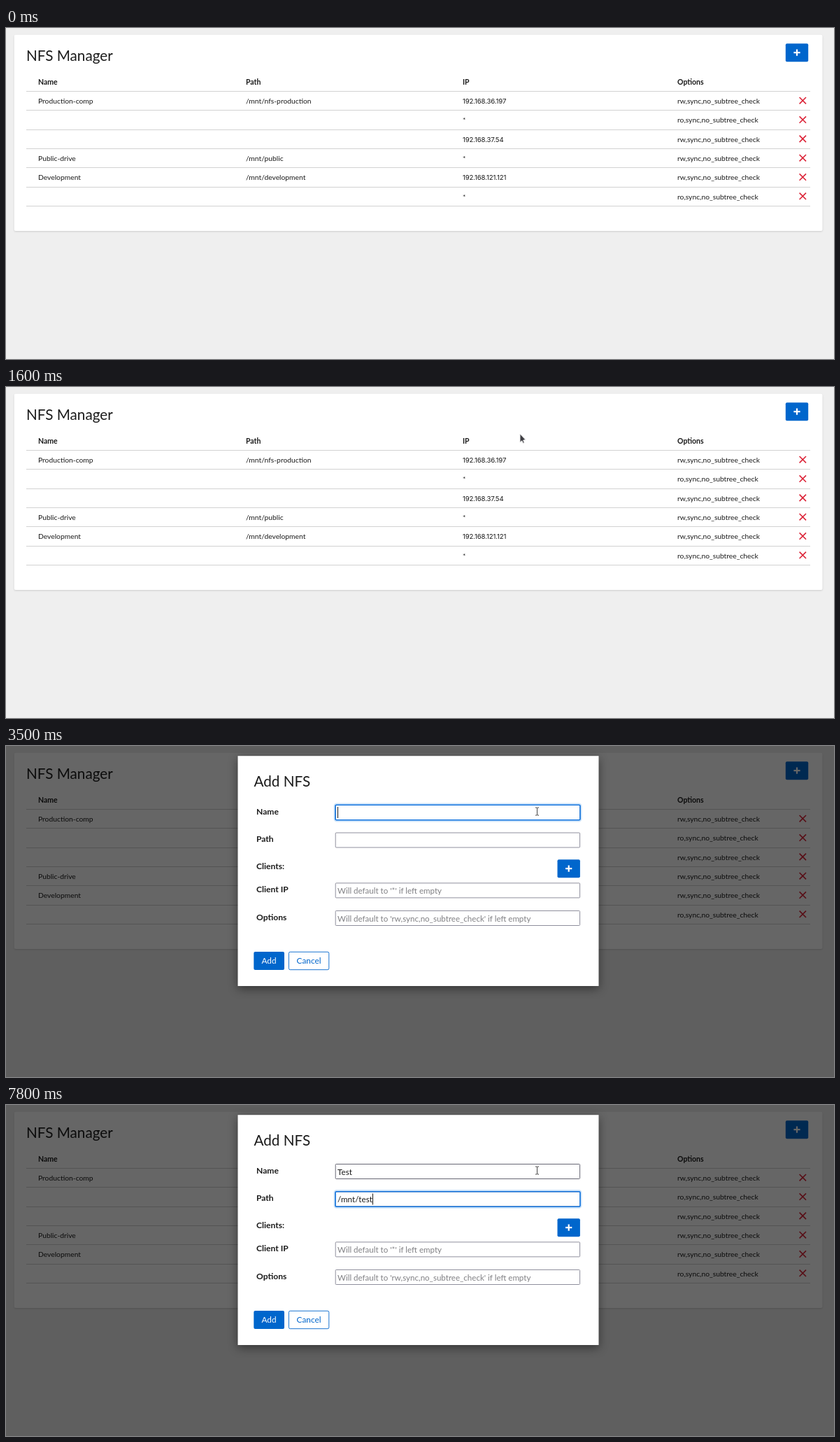
Write an HTML page that moves like this. It is 1184x473 px and loops after 8 s.

```html
<!DOCTYPE html>
<html lang="en">
<head>
<meta charset="utf-8">
<title>NFS Manager</title>
<style>
  html, body { margin: 0; width: 100%; height: 100%; overflow: hidden; background: #efefef; }
  svg { display: block; font-family: Lato, "Open Sans", sans-serif; fill: #1b1b1b; }
  .title { font-size: 20.7px; }
  .head { font-size: 10.5px; font-weight: 700; }
  .cell { font-size: 10.3px; }
  .ip { font: 9.6px Inter, sans-serif; letter-spacing: -.15px; }
  .label { font-size: 12.1px; font-weight: 700; }
  .input { font-size: 11.7px; }
  .hint { font-size: 11.55px; fill: #808084; }
  .button { font-size: 11.8px; text-anchor: middle; }
  .card { filter: drop-shadow(0 1px 1px rgba(3, 3, 3, .14)); }
  .dialog { filter: drop-shadow(0 4px 7px rgba(0, 0, 0, .45)); }
  .cursor { fill: #3d3d42; stroke: #eee; stroke-width: .9; stroke-linejoin: round; }
</style>
</head>
<body>
<svg id="stage" width="1184" height="473" viewBox="0 0 1184 473"></svg>
<script>
const stage = document.getElementById('stage');
const BLUE = '#0066cc', HOVER = '#004080';

const text = (x, y, cls, str, extra = '') =>
  `<text x="${x}" y="${y}" class="${cls}" ${extra}>${str}</text>`;
const rect = (x, y, w, h, fill, extra = '') =>
  `<rect x="${x}" y="${y}" width="${w}" height="${h}" fill="${fill}" ${extra}/>`;
const plusButton = (x, y, id) =>
  rect(x, y, 32.4, 26, BLUE, `rx="2" id="${id}"`) +
  `<path d="M${x + 11.6} ${y + 13}h9.2m-4.6 -4.6v9.2" stroke="#fff" stroke-width="2.2"/>`;

// Table behind the dialog
const RW = 'rw,sync,no_subtree_check', RO = 'ro,sync,no_subtree_check';
const exportsList = [
  ['Production-comp', '/mnt/nfs-production', '192.168.36.197', RW],
  ['', '', '*', RO],
  ['', '', '192.168.37.54', RW],
  ['Public-drive', '/mnt/public', '*', RW],
  ['Development', '/mnt/development', '192.168.121.121', RW],
  ['', '', '*', RO]
];
const columns = [46, 343, 653, 960];
const ROW_TOP = 91, ROW_STEP = 27.33;

const line = y => rect(29, Math.round(y) - 1, 1121, 1, '#d2d2d2');

function tableRow(cells, i) {
  const top = ROW_TOP + i * ROW_STEP;
  const cy = top + 12.7;
  return cells.map((str, c) =>
      text(columns[c], Math.round(top + 17), str.includes('.') ? 'ip' : 'cell', str)).join('') +
    `<path d="M1134.6 ${cy - 4.7}l9.4 9.4m0 -9.4l-9.4 9.4" stroke="#dc2438" stroke-width="1.6"/>` +
    line(top + ROW_STEP);
}

const page =
  rect(0, 0, 1184, 473, '#efefef') +
  rect(11.7, 9.7, 1155.8, 280.3, '#fff', 'rx="2" class="card"') +
  text(29, 47, 'title', 'NFS Manager') +
  plusButton(1114.8, 22.2, 'addButton') +
  rect(29, 91, 1121, 27, '#cbdff4', 'id="hotRow"') +
  ['Name', 'Path', 'IP', 'Options'].map((s, i) => text(columns[i], 81, 'head', s)).join('') +
  line(ROW_TOP) +
  exportsList.map(tableRow).join('');

// Dialog
const fields = [
  { id: 'name', label: 'Name', y: 84, hint: '' },
  { id: 'path', label: 'Path', y: 123.5, hint: '' },
  { id: 'client', label: 'Client IP', y: 195.4, hint: "Will default to '*' if left empty" },
  { id: 'options', label: 'Options', y: 235, hint: `Will default to '${RW}' if left empty` }
];
const field = f =>
  text(358, f.y + 13.5, 'label', f.label) +
  rect(471.2, f.y + .5, 349.4, 21, '#fff', `stroke="#8f8f9d" rx="1" id="${f.id}Box"`) +
  text(474, f.y + 15.5, 'hint', f.hint) +
  text(474, f.y + 15.5, 'input', '', `id="${f.id}Text"`);

const dialog =
  rect(0, 0, 1184, 473, 'rgba(0,0,0,.6)') +
  rect(331.5, 14.2, 516, 328.8, '#fff', 'class="dialog"') +
  text(354.5, 57.5, 'title', 'Add NFS') +
  fields.map(field).join('') +
  text(358, 175.5, 'label', 'Clients:') +
  plusButton(788.5, 162.2, 'clientButton') +
  rect(354.3, 294, 43.7, 26, BLUE, 'rx="2"') +
  text(376, 311.3, 'button', 'Add', 'fill="#fff"') +
  rect(404.4, 294.3, 57.4, 25.4, '#fff', `rx="2" stroke="${BLUE}" stroke-width=".9"`) +
  text(433, 311.3, 'button', 'Cancel', `fill="${BLUE}"`) +
  `<g id="focus" fill="none">
    <rect x="470" y="-1" width="352" height="24" rx="3" stroke="#cfe5fa" stroke-width="3"/>
    <rect x="471" y=".2" width="350" height="21.6" rx="1.5" stroke="#1173de" stroke-width="1.6"/>
    <rect id="caret" y="3" width="1" height="16" fill="#1b1b1b"/>
  </g>`;

const pointers =
  `<g id="pointer">
    <path id="arrow" class="cursor" d="M0 0V12.2L2.7 9.8L4.5 13.4L6.2 12.6L4.6 9.1L8 8.5Z"/>
    <path id="hand" class="cursor" d="M-1.2 1Q0 -.6 1.2 1V4.6L5.4 5.4Q6.7 5.8 6.6 7.2L5.9 12.4H-.6L-3.6 8.6Q-3.8 7 -1.2 8Z"/>
    <path id="beam" d="M-2.5 -5.5H-.5L0 -5L.5 -5.5H2.5M0 -5V5M-2.5 5.5H-.5L0 5L.5 5.5H2.5" fill="none" stroke="#444" stroke-width="1"/>
  </g>`;

stage.innerHTML = page + `<g id="dialog">${dialog}</g>` + pointers;

const $ = id => document.getElementById(id);
const show = (id, on) => $(id).setAttribute('visibility', on ? 'inherit' : 'hidden');

// Pointer waypoints: time, x, y
const route = [
  [300, 300, 19], [500, 345, 66], [700, 398, 103], [800, 420, 109],
  [1100, 468, 102], [1200, 484, 98], [1300, 504, 93], [1400, 550, 86],
  [1600, 735, 67], [1800, 920, 54], [2000, 1053, 46], [2100, 1098, 40],
  [2200, 1122, 37], [2300, 1129.5, 36.5], [2700, 1129.5, 36.5],
  [2800, 895, 64], [2900, 851, 74], [3000, 816, 83], [3100, 787, 90],
  [3300, 759.5, 93.5]
];
const typing = {
  name: { str: 'Test', times: [4500, 4700, 4900, 5100] },
  path: { str: '/mnt/test', times: [6100, 6300, 6500, 6600, 6800, 7400, 7500, 7700, 7800] }
};

function pointerAt(t) {
  const i = route.findIndex(p => p[0] > t);
  if (i < 0) return route[route.length - 1].slice(1);
  if (i === 0) return null;
  const [t0, x0, y0] = route[i - 1], [t1, x1, y1] = route[i];
  const k = (t - t0) / (t1 - t0);
  return [x0 + (x1 - x0) * k, y0 + (y1 - y0) * k];
}

function draw(t) {
  const open = t >= 2800;
  const pos = pointerAt(t);
  const [x, y] = pos || [0, 0];
  const inside = (l, top, r, b) => !!pos && x >= l && x <= r && y >= top && y <= b;
  const onButton = !open && inside(1115, 22, 1147, 48);
  const onField = open && inside(471, 84, 821, 106);

  show('pointer', pos);
  $('pointer').setAttribute('transform', `translate(${x} ${y})`);
  show('arrow', pos && !onButton && !onField);
  show('hand', onButton);
  show('beam', onField);
  show('hotRow', !open && inside(29, 91, 1150, 118));
  // The opener keeps its hover colour until a field is focused
  $('addButton').setAttribute('fill', onButton || (open && t < 3500) ? HOVER : BLUE);
  $('nameBox').setAttribute('stroke', onField ? '#676774' : '#8f8f9d');

  $('dialog').setAttribute('display', open ? 'inline' : 'none');
  for (const id in typing) {
    const { str, times } = typing[id];
    $(id + 'Text').textContent = str.slice(0, times.filter(s => s <= t).length);
  }
  show('focus', t >= 3500);
  if (t >= 3500) {
    const f = fields[t < 5400 ? 0 : 1];
    const input = $(f.id + 'Text');
    const width = input.textContent ? input.getComputedTextLength() : 0;
    $('focus').setAttribute('transform', `translate(0 ${f.y})`);
    $('caret').setAttribute('x', Math.round(474 + width));
  }
}

const LOOP = 8000, STEP = 100;
const start = performance.now();
function tick() {
  const t = (performance.now() - start) % LOOP;
  draw(Math.floor(t / STEP) * STEP);
  requestAnimationFrame(tick);
}
tick();
</script>
</body>
</html>
```
